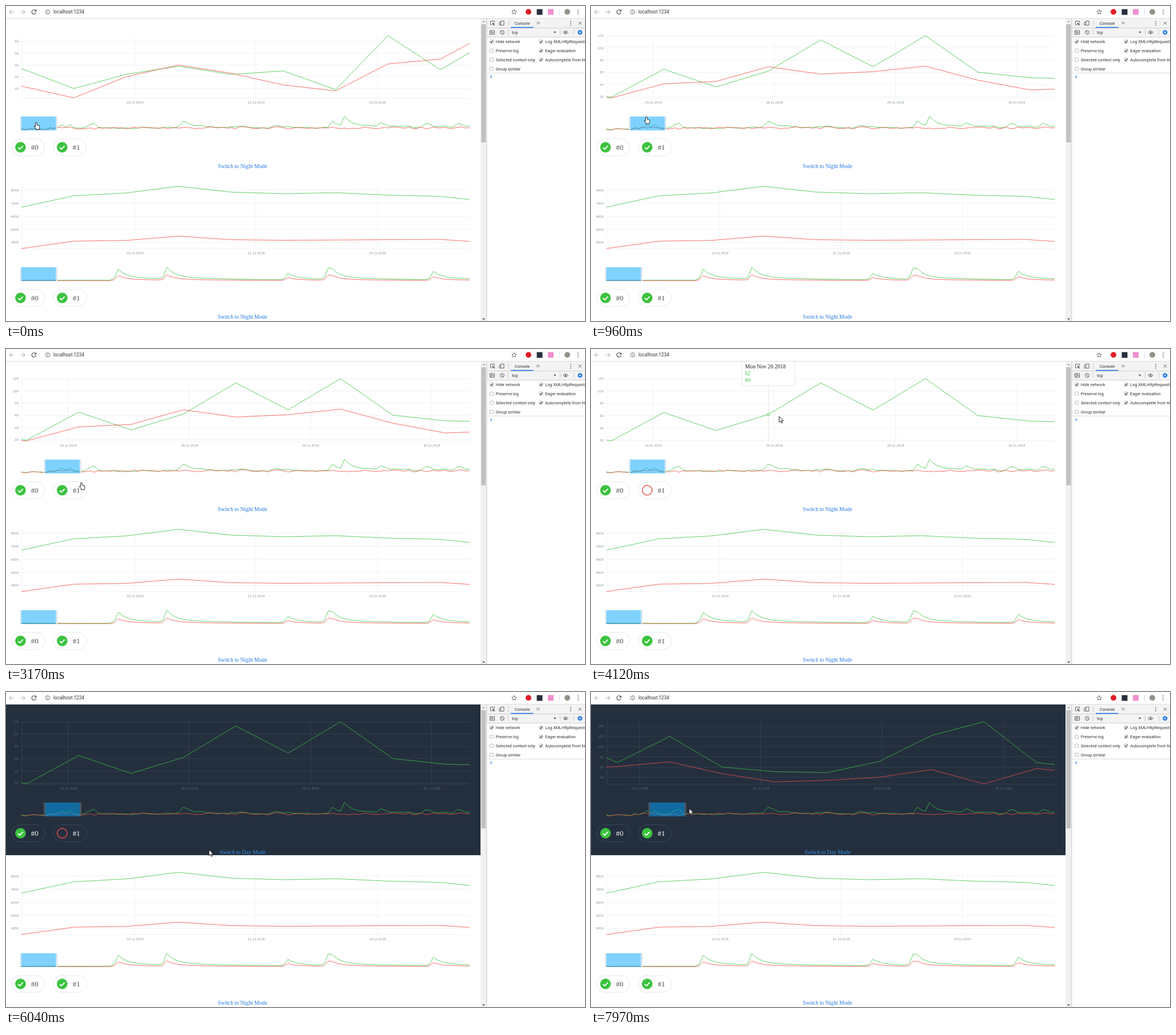
These frames come from a looping animation (1014 px wide and 552 px high, 8 s). An HTML page:

```html
<!DOCTYPE html>
<html lang="en">
<head>
<meta charset="utf-8">
<title>Chart demo</title>
<style>
html, body { margin: 0; width: 100%; height: 100%; overflow: hidden; background: #fff; }
svg { display: block; position: absolute; left: 0; top: 0; }
.tick { font: 6px 'Liberation Sans', Arial, sans-serif; }
.serif { font: 9.7px 'Liberation Serif', 'Times New Roman', serif; }
.name { font: 13px 'Liberation Serif', 'Times New Roman', serif; }
.ui { font: 7.25px Roboto, 'Open Sans', sans-serif; fill: #333; }
.icon { fill: none; stroke: #5f6368; stroke-width: 1; }
.series { fill: none; stroke-width: .8; stroke-linejoin: round; }
</style>
</head>
<body>
<svg width="1014" height="552" viewBox="0 0 1014 552">
  <g id="second"></g>
  <g id="first"></g>
  <g id="chrome"></g>
  <g id="overlay"></g>
</svg>
<script>
const LOOP = 8000, DAY = 864e5, FIRST_DAY = Date.UTC(2018, 10, 17), DAYS = 112;
const LEFT = 27, RIGHT = 812, TOP = 30, BOTTOM = 139, SPAN = 8.56, PANEL = 264;
const DAY_W = (RIGHT - LEFT) / SPAN, MINI_W = (RIGHT - LEFT) / (DAYS - 1);
const GREEN = '#3cc23f', RED = '#f34c44';
const RED_OFF = 3480, NIGHT_AT = 5700, RED_ON = 6600;

const LIGHT = { grid: '#f1f3f5', label: '#8b979f', pill: '#e4eaee', name: '#4d5256',
  link: '#2277e0', handle: '#d9e6f0', hover: '#dfe6eb', mode: 'Night' };
const NIGHT = { grid: '#313d4d', label: '#546778', pill: '#344658', name: '#fff',
  link: '#3a93ee', handle: '#505c6b', hover: '#3b4a5a', mode: 'Day' };

// Daily values of the days that scroll into view; later days follow a rule.
const visits = {
  a: [37,20,32,39,32,35,19,65,36,62,113,69,120,60,51,49,71,122,149,69,57],
  b: [22,12,30,40,33,23,18,41,45,69,57,61,70,47,31,34,40,55,27,57,48]
};
const views = {
  a: [6706,7579,7798,8307,7866,7736,7816,7630,7536,7105],
  b: [3522,4088,4146,4477,4202,4157,4177,4203,4223,3948]
};
// day: height
const visitSpikes = { 40: 130, 54: 35, 63: 65, 77: 130, 80: 220, 89: 90, 100: 90, 108: 80 };
const viewSpikes = { 24: 19, 36: 22.5, 66: 12, 76: 21.5, 77: 20, 102: 15.5 };

// pointer moves: from, to, x, y
const moves = [
  [150, 870, 97, 194], [970, 1760, 351, 121], [1800, 1900, 377, 120], [2140, 2890, 176, 226],
  [2940, 3350, 98, 251], [3720, 4120, 329.5, 118], [4150, 4310, 342, 120], [4460, 4700, 255, 140],
  [4700, 5220, 376, 300], [5270, 5420, 373, 280], [6010, 6500, 98, 250], [6860, 7000, 108, 197],
  [7060, 7430, 142, 197], [7430, 7630, 172, 194], [7680, 7970, 172, 204]
];

const byId = id => document.getElementById(id);
const ramp = (t, from, to) => Math.min(1, Math.max(0, (t - from) / (to - from)));
const noise = i => { const v = Math.sin(i * 12.9898) * 43758.5453; return v - Math.floor(v); };
const snap = v => Math.floor(v) + .5;

// y starts fast on the way up and slow on the way down
function pointerAt(t) {
  let x = 53, y = 204;
  for (const [from, to, nx, ny] of moves) {
    const k = ramp(t, from, to);
    x += (nx - x) * k;
    y += (ny - y) * (ny < y ? 1 - (1 - k) ** 2 : k * k);
  }
  return [x, y];
}

function valueAt(list, day) {
  const i = Math.min(Math.floor(day), list.length - 2);
  return list[i] + (list[i + 1] - list[i]) * (day - i);
}
function visible(list, start) {
  const end = start + SPAN, out = [[start, valueAt(list, start)]];
  for (let d = Math.floor(start) + 1; d < end; d++) out.push([d, list[d]]);
  out.push([end, valueAt(list, end)]);
  return out;
}
function tickStep(range) {
  const raw = range / 5, pow = 10 ** Math.floor(Math.log10(raw)), e = raw / pow;
  return pow * (e >= 7.07 ? 10 : e >= 3.16 ? 5 : e >= 1.41 ? 2 : 1);
}
const text = (x, y, s, cls, fill, anchor = 'start') =>
  `<text x="${x}" y="${y}" class="${cls}"${fill ? ` fill="${fill}"` : ''} text-anchor="${anchor}">${s}</text>`;
const rect = (x, y, w, h, fill, more = '') =>
  `<rect x="${x}" y="${y}" width="${w}" height="${h}" fill="${fill}" ${more}/>`;
const circle = (x, y, r, fill, more = '') => `<circle cx="${x}" cy="${y}" r="${r}" fill="${fill}" ${more}/>`;
const path = (d, more = 'class="icon"') => `<path d="${d}" ${more}/>`;
const rule = (x1, y1, x2, y2, color) => path(`M${x1} ${y1}L${x2} ${y2}`, `fill="none" stroke="${color}"`);
const poly = (pts, color, alpha = 1) => `<polyline class="series" stroke="${color}" opacity="${alpha}" points="${
  pts.map(p => p[0].toFixed(2) + ',' + p[1].toFixed(2)).join(' ')}"/>`;

function scaleFor(data, start, red) {
  const a = visible(data.a, start), b = visible(data.b, start);
  const va = a.map(p => p[1]), all = va.concat(b.map(p => p[1]));
  const mix = f => f(...va) + (f(...all) - f(...va)) * red;
  const min = mix(Math.min), max = mix(Math.max);
  return { a, b, min, max,
    x: d => LEFT + (d - start) * DAY_W,
    y: v => BOTTOM - (v - min) / (max - min) * (BOTTOM - TOP) };
}

function mainChart(s, start, red, c) {
  let grid = rule(LEFT, BOTTOM + .5, RIGHT, BOTTOM + .5, c.grid) + rule(LEFT + .5, TOP, LEFT + .5, BOTTOM, c.grid);
  let labels = '';
  const step = tickStep(s.max - s.min);
  for (let v = Math.ceil(s.min / step) * step; v <= s.max; v += step) {
    const y = s.y(v);
    grid += rule(LEFT, snap(y), RIGHT, snap(y), c.grid);
    labels += text(22, y + 2.2, v, 'tick', c.label, 'end');
  }
  const gap = 2e8;
  for (let k = Math.ceil((FIRST_DAY + start * DAY) / gap); ; k++) {
    const x = s.x((k * gap - FIRST_DAY) / DAY);
    if (x > RIGHT) break;
    const date = new Date(k * gap).toISOString().slice(0, 10).split('-').reverse().join('.');
    grid += rule(snap(x), TOP, snap(x), BOTTOM, c.grid);
    labels += text(x + .3, 148.7, date, 'tick', c.label, 'middle');
  }
  const line = pts => pts.map(([d, v]) => [s.x(d), s.y(v)]);
  return grid + labels + poly(line(s.a), GREEN) + (red > 0 ? poly(line(s.b), RED, red) : '');
}

// sharp rise, quick drop, long tail
const spike = d => d < -1 ? 0 : d < 0 ? .2 : .72 * Math.exp(-d / 2) + .28 * Math.exp(-d / 14);
const lift = (spikes, i) =>
  Math.max(...Object.entries(spikes).map(([day, height]) => height * spike(i - day)));
const miniLine = y => Array.from({ length: DAYS }, (_, i) => [LEFT + i * MINI_W, y(i)]);
const visitY = v => 195.3 - (v - 12) / 266 * 23.3;
const miniVisits = [
  miniLine(i => visitY(visits.a[i] ?? 38 + 34 * noise(i) + lift(visitSpikes, i))),
  miniLine(i => visitY(visits.b[i] ?? 32 + 45 * noise(i + 200)))
];
const miniViews = [
  miniLine(i => 194.4 - lift(viewSpikes, i)),
  miniLine(i => 195.3 - .45 * lift(viewSpikes, i))
];

function miniChart(lines, start, c) {
  const x = LEFT + start * MINI_W, w = SPAN * MINI_W;
  return poly(lines[0], GREEN) + poly(lines[1], RED) +
    rect(x, 171.7, w, 24.3, 'rgb(0,165,255)', 'opacity=".5"') +
    rect(x - 2.5, 171.7, 2.5, 24.3, c.handle) + rect(x + w, 171.7, 2.5, 24.3, c.handle);
}

function toggle(x, label, on, c) {
  const cx = x + 15.9;
  return rect(x + .5, 210.5, 58, 30, 'none', `rx="15" stroke="${c.pill}"`) +
    (on ? circle(cx, 225.5, 9.3, GREEN) +
        path(`M${cx - 4.3} 226l3 3 5.6-5.8`, 'fill="none" stroke="#fff" stroke-width="1.8"')
      : circle(cx, 225.5, 8.6, 'none', `stroke="${RED}" stroke-width="1.5"`)) +
    text(x + 34.3, 230, label, 'name', c.name);
}

function tooltip(data, s, day, red, c) {
  const x = s.x(day), l = x - 47, a = data.a[day], b = data.b[day];
  const [week, date, month, year] = new Date(FIRST_DAY + day * DAY).toUTCString().replace(',', '').split(' ');
  const dot = (v, color) => circle(x, s.y(v), 2, '#fff', `stroke="${color}"`);
  const column = (cx, v, name, color) =>
    text(cx, 24.3, v, 'serif', color) + text(cx, 36.3, name, 'serif', color);
  const next = l + 18.6 + String(a).length * 4.85;
  return rule(x, TOP, x, BOTTOM, c.hover) + dot(a, GREEN) + (red ? dot(b, RED) : '') +
    rect(l + .5, -.5, 93, 42.5, '#fff', 'rx="3" stroke="#e3e8ec"') +
    text(l + 6, 12, `${week} ${month} ${date} ${year}`, 'serif', '#222') +
    column(l + 6, a, '#0', GREEN) + (red ? column(next, b, '#1', RED) : '');
}

function panel(data, mini, top, start, red, on, c, [px, py]) {
  const s = scaleFor(data, start, red);
  let out = c === NIGHT ? rect(0, 0, 831, PANEL, '#242f3e') : '';
  out += mainChart(s, start, red, c) + miniChart(mini, start, c) +
    toggle(9.5, '#0', true, c) + toggle(82.5, '#1', on, c) +
    text(414.3, 261.5, `Switch to ${c.mode} Mode`, 'serif', c.link, 'middle');
  if (inside(px, py, LEFT, top, RIGHT, top + 153)) {
    const day = Math.round(start + (px - LEFT) / DAY_W);
    out += tooltip(data, s, day, red > .5, c);
  }
  return `<g transform="translate(0 ${top})">${out}</g>`;
}

function checkbox(x, y, on, label) {
  return rect(x - 3, y - 3, 6, 6, '#fff', 'rx="1" stroke="#a9a9a9" stroke-width=".8"') +
    (on ? path(`M${x - 1.9} ${y}l1.5 1.6 2.6-3.4`, 'fill="none" stroke="#333" stroke-width="1.2"') : '') +
    text(x + 7.3, y + 2.8, label, 'ui');
}
const dots = (x, y) => [-3.4, 0, 3.4].map(d => circle(x, y + d, .9, '#5f6368')).join('');

function chrome() {
  const grey = 'fill="none" stroke="#b9bbbe" stroke-width="1.1"';
  const bar = rect(0, 0, 1014, 22, '#fff') + rule(0, 21.5, 1014, 21.5, '#dcdcdc') +
    path('M14.5 10.5h-8m3.6-3.8l-3.8 3.8 3.8 3.8', grey) + path('M25 10.5h8m-3.6-3.8l3.8 3.8-3.8 3.8', grey) +
    path('M52 8a3.8 3.8 0 1 0 .6 3.4', 'fill="none" stroke="#50545a" stroke-width="1.2"') +
    path('M53.3 5.8v3.9h-3.9z', 'fill="#50545a"') +
    circle(73, 10.3, 3.7, 'none', 'stroke="#5f6368" stroke-width=".9"') + path('M73 9.8v2.6M73 7.9v1') +
    `<text x="83" y="13.2" style="font:8.2px Roboto,sans-serif" fill="#333">localhost:1234</text>` +
    path('M890 6.2l1.2 2.8 3 .2-2.3 2 .8 3-2.7-1.7-2.7 1.7.8-3-2.3-2 3-.2z', 'fill="none" stroke="#5f6368" stroke-width=".9"') +
    circle(915, 10.3, 5, '#e01e26') + rect(929.5, 5.5, 10, 10, '#26303d') +
    rect(949, 5.3, 10, 10, '#f08fd0') + rule(969.5, 5, 969.5, 16, '#d8dadc') +
    circle(983, 10.3, 5, '#8d9488') + dots(1002, 10.3);
  const scrollbar = rect(831, 22, 10.5, 530, '#f1f1f1') + rect(832.3, 32, 8, 207, '#c1c1c1') +
    path('M834 28.6h5l-2.5-2.8z', 'fill="#a3a3a3"') + path('M834 547.4h5l-2.5 2.8z', 'fill="#505050"');
  const options = [
    ['+Hide network', '-Preserve log', '-Selected context only', '-Group similar'],
    ['+Log XMLHttpRequests', '+Eager evaluation', '+Autocomplete from history']
  ];
  const boxes = options.map((list, col) => list.map((s, row) =>
    checkbox(850.5 + col * 86.5, 62.5 + row * 15.85, s[0] === '+', s.slice(1))).join('')).join('');
  const tools = rect(841.5, 22, 173, 530, '#fff') + rect(841.5, 22, 173, 32.5, '#f3f3f3') +
    rule(841.8, 22, 841.8, 552, '#c8c8c8') + rule(842, 38.5, 1014, 38.5, '#d0d0d0') +
    rule(842, 54.5, 1014, 54.5, '#d0d0d0') + rule(842, 117.5, 1014, 117.5, '#dcdcdc') +
    path('M851 33h-2.5v-6.5h7v2.5') + path('M851.5 29l5 2-2 .8 1.8 1.8-.9.8-1.8-1.8-.9 1.8z', 'fill="#5f6368"') +
    path('M866.5 33.5h-2.5v-5h2.5M866.5 26.2h5.5v7.3h-5.5z') + rule(880, 25, 880, 35, '#ccc') +
    `<text x="890.7" y="32.9" style="font:7.4px Roboto,sans-serif" fill="#333">Console</text>` +
    rect(884, 36.8, 39.5, 1.5, '#1a73e8') + path('M929.3 27.5l2.2 2.3-2.2 2.3M932.3 27.5l2.2 2.3-2.2 2.3') +
    dots(989, 30) + path('M1003 27.5l5 5m0-5l-5 5') +
    path('M847.5 43h8v6.5h-8zM849.8 43v6.5') + path('M851.5 44.3l2.7 2-2.7 2z', 'fill="#5f6368"') +
    circle(869, 46.3, 3.4, 'none', 'class="icon"') + path('M866.6 43.9l4.8 4.8') +
    rule(879.5, 41, 879.5, 51, '#ccc') + text(886, 48.8, 'top', 'ui') +
    path('M959 44.8h4.4l-2.2 3.2z', 'fill="#555"') + rule(970.5, 41, 970.5, 51, '#ccc') +
    path('M975.6 46.2q4.4-5.2 8.8 0q-4.4 5.2-8.8 0z') + circle(980, 46.2, 1.5, '#5f6368') +
    rule(994.5, 41, 994.5, 51, '#ccc') +
    circle(1005.3, 46.2, 3.5, 'none', 'stroke="#1a73e8" stroke-width="1.6" stroke-dasharray="1.8 .95"') +
    circle(1005.3, 46.2, 2.3, 'none', 'stroke="#1a73e8" stroke-width="1.7"') +
    boxes + path('M848.5 122l2.2 2.1-2.2 2.1', 'fill="none" stroke="#367cf1" stroke-width="1.1"');
  return bar + scrollbar + tools;
}

const inside = (x, y, l, t, r, b) => x >= l && x <= r && y >= t && y <= b;
function cursor(x, y, start) {
  const win = LEFT + start * MINI_W;
  const hand = inside(x, y, win, 193, win + SPAN * MINI_W, 218) || inside(x, y, 10, 233, 68, 262) ||
    inside(x, y, 83, 233, 141, 262) || inside(x, y, 371, 274, 458, 287);
  const d = hand
    ? 'M-1.3 7.6V.8Q0-.9 1.3.8V4.6L5 5.4Q6.3 5.8 6.1 7.6L5.2 10.3V12.6H-.4V11L-3.6 7.6Q-3.8 5.8-2.3 6.4Z'
    : 'M0 0V10.3L2.3 8.2 4 12 5.7 11.2 4.1 7.6H7.3Z';
  return `<g transform="translate(${x} ${y})">${path(d, 'fill="#fff" stroke="#111" stroke-width=".9" stroke-linejoin="round"')}</g>`;
}

function render(t) {
  const tip = pointerAt(t), [x, y] = tip;
  const start = 5.906 * ramp(t, 150, 870) + 4.884 * ramp(t, 7060, 7430);
  const red = 1 - ramp(t, RED_OFF, RED_OFF + 200) + ramp(t, RED_ON, RED_ON + 200);
  const on = t < RED_OFF || t >= RED_ON, theme = t < NIGHT_AT ? LIGHT : NIGHT;
  const pressed = [RED_OFF, NIGHT_AT, RED_ON].some(at => t >= at - 120 && t < at);
  byId('first').innerHTML = panel(visits, miniVisits, 22, start, red, on, theme, tip);
  byId('second').innerHTML = panel(views, miniViews, 22 + PANEL, 0, 1, true, LIGHT, tip);
  byId('overlay').innerHTML =
    (pressed ? circle(x - .8, y + 1, 7, '#ffe92e', 'opacity=".8"') : '') + cursor(x, y, start);
}

byId('chrome').innerHTML = chrome();
const began = performance.now();
function frame() {
  render((performance.now() - began) % LOOP);
  requestAnimationFrame(frame);
}
frame();
</script>
</body>
</html>
```
